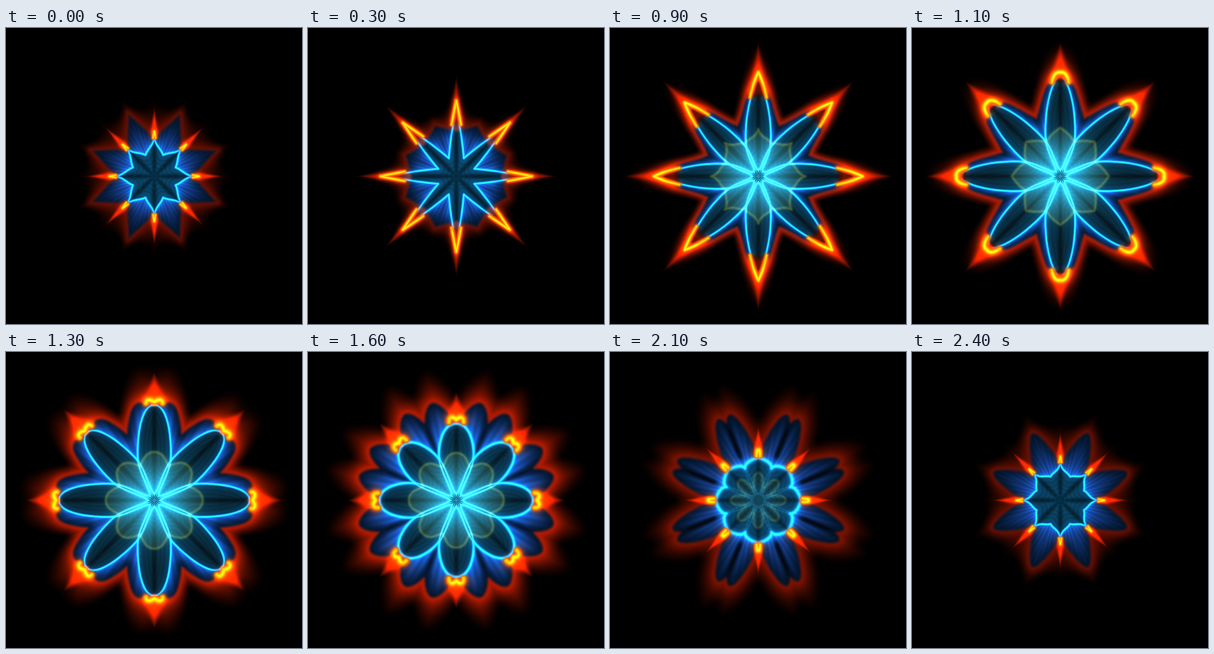
Write an HTML page with a canvas that moves like this. It is 500 px wide and 500 px high and loops after 2.5 s.

```html
<!DOCTYPE html>
<html lang="en">
<head>
<meta charset="utf-8">
<title>Kaleidoscope star</title>
<style>
  html, body { margin: 0; width: 100%; height: 100%; overflow: hidden; background: #000; }
  canvas { display: block; width: 500px; height: 500px; }
</style>
</head>
<body>
<canvas id="stage" width="500" height="500"></canvas>
<script>
const SIZE = 500, MID = 250, REACH = 242, STEP = 100, STEPS = 25;
const WEDGE = Math.PI / 8, COS = Math.cos(WEDGE), SIN = Math.sin(WEDGE);
const ctx = document.getElementById('stage').getContext('2d');
const image = ctx.createImageData(SIZE, SIZE);
const data = image.data;
for (let i = 3; i < data.length; i += 4) data[i] = 255;

const mix = (a, b, t) => a + (b - a) * t;
const bell = (x, w) => Math.exp(-x * x / (w * w));

function ramp(a, b, x) {
  const t = Math.min(1, Math.max(0, (x - a) / (b - a)));
  return t * t * (3 - 2 * t);
}

function cubic(p0, p1, p2, p3, count = 12) {
  const pts = [];
  for (let i = 0; i <= count; i++) {
    const t = i / count, s = 1 - t;
    const at = n => s * s * s * p0[n] + 3 * s * s * t * p1[n] + 3 * s * t * t * p2[n] + t * t * t * p3[n];
    pts.push(at(0), at(1));
  }
  return pts;
}

// All shapes live in one half wedge: u runs along the axis, v across it.
const onEdge = r => [r * COS, r * SIN];

// A petal from its tip on the axis to the notch it shares with its neighbour.
function leaf(tip, notch, round, v1, v2) {
  return cubic([tip, 0], [tip * mix(.78, 1, round), v1], [.46 * (tip + notch), v2], onEdge(notch));
}

// A straight side from axis to wedge edge, pushed out at one and two thirds.
function side(tip, notch, push1, push2) {
  const end = onEdge(notch);
  const third = (k, push) => [mix(tip, end[0], k / 3) + push[0], end[1] * k / 3 + push[1]];
  return cubic([tip, 0], third(1, push1), third(2, push2), end);
}

// Signed distance to a polyline, negative on the side of the centre.
function distance(pts, u, v) {
  let best = 1e9, sign = 1;
  for (let i = 0; i < pts.length - 2; i += 2) {
    const su = pts[i + 2] - pts[i], sv = pts[i + 3] - pts[i + 1];
    const pu = u - pts[i], pv = v - pts[i + 1];
    const t = Math.min(1, Math.max(0, (pu * su + pv * sv) / (su * su + sv * sv)));
    const du = pu - su * t, dv = pv - sv * t, d = du * du + dv * dv;
    if (d < best) {
      best = d;
      sign = su * pv - sv * pu < 0 ? 1 : -1;
    }
  }
  return sign * Math.sqrt(best);
}

// Shapes and light at phase p of the loop, 0 to 1.
function pose(p) {
  const gate = (a, b, c, d) => ramp(a, b, p) * (1 - ramp(c, d, p));
  const wave = peak => Math.cos(2 * Math.PI * (p - peak));

  const swell = gate(-.02, .25, .42, .94);
  const round = gate(.3, .54, .76, .96);
  const belly = gate(.1, .3, .76, .96);
  const core = gate(.14, .4, .6, .92);
  const bloom = gate(.38, .6, .85, 1.03);

  const tip = 62 + 110 * swell;
  const notch = 55 - 22 * wave(.12);
  const petal = leaf(tip, notch, round, 4 + 5 * belly + 14 * round, notch * SIN * .7 + 10 * belly);
  const lens = cubic([10, 0], [notch * .3, notch * .13], [notch * .65, notch * .19], onEdge(notch));
  const oliveNotch = 15 + 48 * core;
  const olive = leaf(40 + 42 * core, oliveNotch, round, 3 + 13 * round, oliveNotch * SIN * .8);

  const push1 = [28 * gate(.16, .5, .76, 1), 14 * gate(.2, .44, .5, .7) - 8 * bloom * (1 - swell)];
  const push2 = [60 * bloom, 15 * bloom];
  const lobe = side(66 + 100 * gate(.05, .4, .45, .92), 117 - 32 * wave(.24), push1, push2);
  const valley = 1 - gate(.12, .28, .76, .96);
  const halo = side(
    145 + 85 * gate(-.05, .28, .5, .76), 154 - 54 * wave(.24),
    [1.3 * push1[0] - 42 * valley, 1.3 * push1[1] - 12 * valley],
    [1.2 * push2[0] - 32 * valley, push2[1]]
  );

  const base = tip + 2 - 50 * gate(-.02, .2, .3, .52);
  const nose = tip + 12 - 8 * swell;
  const spread = 2 + 12 * gate(0, .24, .56, .9);
  const bend = [mix((base + nose) / 2, nose + 8, round), spread * mix(.55, 1, round)];
  const flame = cubic(
    [nose, 0], [mix(nose, bend[0], 2 / 3), bend[1] * 2 / 3],
    [mix(base, bend[0], 2 / 3), mix(spread, bend[1], 2 / 3)], [base, spread]
  );

  return {
    petal, lens, olive, lobe, halo, flame, notch, core, base,
    coreSize: 15 + 38 * core,
    oliveGain: .7 * gate(.16, .28, .76, .94),
    stroke: 2.5 + 2.5 * round,
    redTip: nose + 42 + 10 * belly * swell,
    redWidth: 7 + 1.2 * spread,
    redGain: .5 + .4 * gate(.1, .28, .56, .95),
    reach: 30 + 22 * wave(.82),
    width: 1.6 + 2.2 * gate(.54, .76, .8, .96),
    seam: gate(.5, .72, .8, .95)
  };
}

function makeShader(s) {
  const rgb = [0, 0, 0];
  const add = (k, r, g, b) => { rgb[0] += k * r; rgb[1] += k * g; rgb[2] += k * b; };

  function flames(u, v) {
    if (u < s.base - 25 || u > s.redTip + 5 || v > s.redWidth * 2.5) return 0;
    const d = distance(s.flame, u, v), far = Math.abs(d);
    const left = Math.max(.02, 1 - (u - s.base) / (s.redTip - s.base));
    const fill = bell(v, s.redWidth * Math.min(1, left) * .75) * ramp(s.base - 3, s.base + 12, u);
    const hollow = 1 - .6 * ramp(s.stroke, s.stroke * 2.5, -d);
    const orange = Math.exp(-far / (s.stroke * 1.2)) * ramp(s.base - 14, s.base + 2, u);
    const yellow = bell(far, s.stroke);
    add(fill * Math.min(1, left * 2) * hollow, 225, 32, 0);
    add(orange, 200, 70, 0);
    add(yellow, 255, 150, 15);
    return Math.min(1, fill * .6 + orange + yellow);
  }

  function center(r, a, u, v) {
    if (s.oliveGain > 0) {
      const d = distance(s.olive, u, v);
      add(s.oliveGain * bell(d, 2.4), 75, 70, 5);
      add(s.oliveGain * ramp(2, -3, d) * .5, 60, 62, 20);
    }
    if (s.core > 0) {
      const light = s.core * bell(r, s.coreSize) * ramp(-4, 18, r + 8 * Math.cos(a * 16));
      add(light, 15, 120, 165);
      const d = Math.abs(distance(s.lens, u, v));
      add(s.core * (bell(d, 1.5) + .4 * Math.exp(-d / 4)), 35, 130, 170);
    }
  }

  return (r, a) => {
    const u = r * Math.cos(a), v = r * Math.sin(a);
    rgb[0] = rgb[1] = rgb[2] = 0;

    const dPetal = distance(s.petal, u, v), dLobe = distance(s.lobe, u, v), dHalo = distance(s.halo, u, v);
    const cool = 1 - flames(u, v);
    const cold = cool * (1 - ramp(s.base - 4, s.base + 10, u));
    const inPetal = ramp(1, -3, dPetal), inLobe = ramp(4, -5, dLobe);
    const around = inLobe * (1 - inPetal) * cool;

    // blue lobes, split by a dark seam
    const edge = r * Math.sin(WEDGE - a);
    let blue = around * .85 * Math.exp(-Math.max(0, dPetal) / s.reach);
    blue *= .35 + .65 * ramp(0, -22, dLobe);
    blue *= 1 + .13 * Math.cos(a * 70 + r * .03);
    const split = 1 - s.seam * bell(edge, 5) * ramp(68, 82, r) * ramp(150, 120, r);
    add(blue * split, 35, 85, 200);
    add(around * split * .5, 0, 26, 50);

    // petal inside and outline
    const dim = (.55 + .45 * ramp(0, 7, v)) * (1 + .07 * Math.cos(dPetal * .9));
    add(inPetal * cold * dim, 9, 38, 52);
    add(inPetal * dim * Math.exp(-r / 40), 0, 45, 75);
    const near = Math.abs(dPetal);
    const rim = Math.max(cold, cool * ramp(.1, .9, s.core) * ramp(4, 6, s.stroke + 1));
    add(bell(near, s.width) * rim, 15, 165, 230);
    add(Math.exp(-near / (s.width * 3)) * rim * .5, 0, 90, 180);

    if (r < 110) center(r, a, u, v);

    if (dHalo < 0) {
      const x = -dHalo / (Math.max(0, dLobe) - dHalo);
      add((1 - inLobe) * Math.pow(x, 1.6) * s.redGain, 235, 35, 0);
    }
    return rgb;
  };
}

function put(x, y, rgb) {
  const p = (y * SIZE + x) * 4;
  for (let c = 0; c < 3; c++) data[p + c] = rgb[c];
}

// Shade one eighth of the disc and mirror it into the others.
function draw(step) {
  const shade = makeShader(pose(step / STEPS));
  for (let i = 0; i < REACH; i++) {
    for (let j = 0; j <= i; j++) {
      const r = Math.hypot(i, j);
      if (r > REACH) break;
      const turn = Math.atan2(j, i);
      const rgb = shade(r, Math.min(turn, 2 * WEDGE - turn));
      for (const sx of [-1, 1]) {
        for (const sy of [-1, 1]) {
          put(MID + sx * i, MID + sy * j, rgb);
          put(MID + sx * j, MID + sy * i, rgb);
        }
      }
    }
  }
  ctx.putImageData(image, 0, 0);
}

const start = performance.now();
let shown = -1;
function tick() {
  const step = Math.floor((performance.now() - start) / STEP) % STEPS;
  if (step !== shown) draw(shown = step);
  requestAnimationFrame(tick);
}
tick();
</script>
</body>
</html>
```
